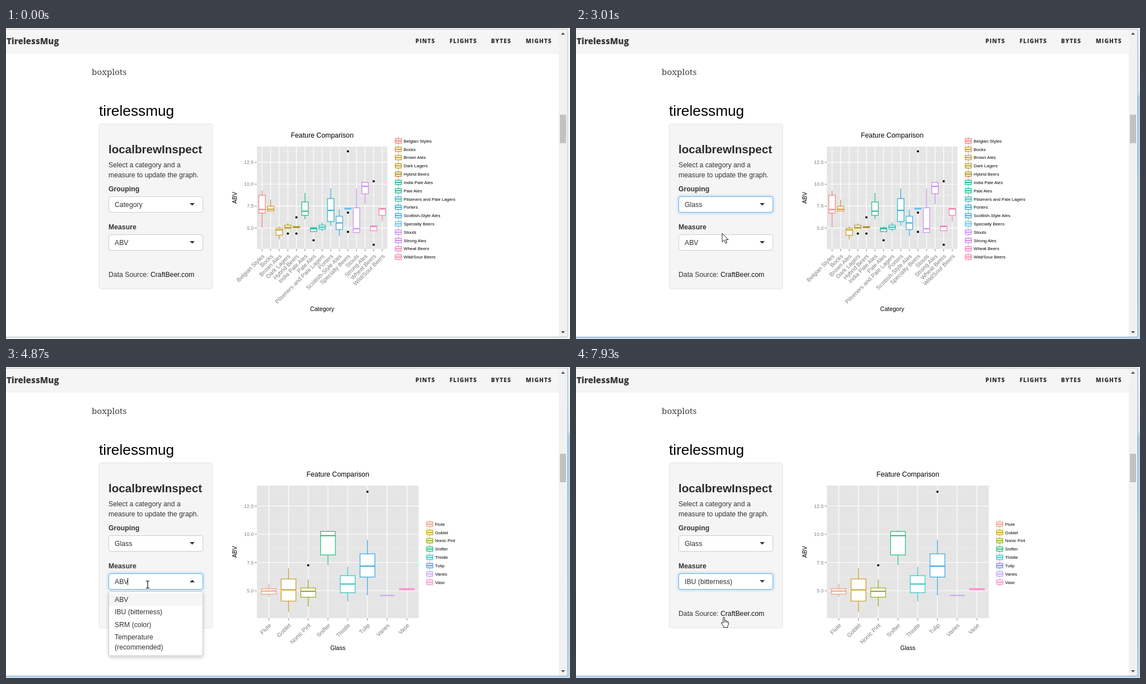
Animation of 1007 by 556 pixels, one loop 8000 ms. Source, as an HTML page:

```html
<!DOCTYPE html>
<html lang="en">
<head>
<meta charset="utf-8">
<title>boxplots</title>
<style>
html, body { margin: 0; width: 100%; height: 100%; overflow: hidden; background: #fff; }
svg { display: block; width: 1007px; height: 556px; font: 12.25px "Liberation Sans", Arial, sans-serif; }
text { white-space: pre; }
.nav { font: 800 10.2px "Open Sans", sans-serif; letter-spacing: 1px; }
.brand { font: 800 15px "Open Sans", sans-serif; }
.serif { font: 500 15.3px "Noto Serif", serif; }
</style>
</head>
<body>
<svg id="stage" viewBox="0 0 1007 556">
  <defs>
    <linearGradient id="edge" x2="0" y2="1">
      <stop offset="0" stop-color="#f2f6fa"/><stop offset=".2" stop-color="#dfeaf5"/>
      <stop offset=".22" stop-color="#b5d2ec"/><stop offset="1" stop-color="#c3daf0"/>
    </linearGradient>
    <filter id="glow" x="-10%" y="-40%" width="120%" height="180%"><feGaussianBlur stdDeviation="2"/></filter>
    <filter id="shade" x="-10%" y="-20%" width="120%" height="150%">
      <feDropShadow dx="0" dy="3" stdDeviation="3" flood-opacity=".2"/>
    </filter>
  </defs>
  <g id="page"></g>
  <g id="live"></g>
</svg>
<script>
const LOOP = 8000;
const $ = id => document.getElementById(id);
const rect = (x, y, w, h, fill, more = '') =>
  `<rect x="${x}" y="${y}" width="${w}" height="${h}" fill="${fill}" ${more}/>`;
const line = (x1, y1, x2, y2, color, w = 1) =>
  `<path d="M${x1} ${y1}L${x2} ${y2}" stroke="${color}" stroke-width="${w}"/>`;
const text = (x, y, s, fill = '#333', more = '') => `<text x="${x}" y="${y}" fill="${fill}" ${more}>${s}</text>`;
const size = n => `font-size="${n}"`;
const MID = 'text-anchor="middle" ', END = 'text-anchor="end" ';

// Each box: name, colour, y of high whisker, upper quartile, median, lower quartile, low whisker, outliers
const byCategory = {
  title: 'Category', right: 681, bottom: 395, y5: 357.6, unit: 15.67, keyX: 694, keyY: 202,
  boxes: [
    ['Belgian Styles', '#f77b7b', 291, 299, 324.5, 331, 357],
    ['Bocks', '#d6932c', 307, 318.5, 324, 327, 327],
    ['Brown Ales', '#c79a20', 355, 358, 361, 370.5, 378],
    ['Dark Lagers', '#b99a17', 349, 352.5, 356.5, 358, 358, 367.5],
    ['Hybrid Beers', '#a98f18', 355, 355, 356, 357, 357, 338.5, 367.5],
    ['India Pale Ales', '#1bb68c', 295, 311, 327.5, 335, 342],
    ['Pale Ales', '#19b79b', 355, 357, 359, 364, 364, 379.5],
    ['Pilseners and Pale Lagers', '#27b9b4', 348, 352.5, 356, 359.5, 363],
    ['Porters', '#1fb0d2', 287, 305, 326, 346, 353],
    ['Scottish-Style Ales', '#37abdc', 324.5, 336.5, 348.5, 360.5, 372],
    ['Specialty Beers', '#5cc0ee', 322, 322, 322.7, 324, 324, 220.5, 330, 364.5],
    ['Stouts', '#cb8cf0', 287, 321.5, 359, 365.5, 366],
    ['Strong Ales', '#c983ee', 276, 276, 283, 296.5, 315],
    ['Wheat Beers', '#f580c0', 353, 354, 355, 362.5, 363, 274, 387.5],
    ['Wild/Sour Beers', '#f97fab', 322, 322.5, 323.5, 335, 346]
  ]
};
const byGlass = {
  title: 'Glass', right: 737, bottom: 449, y5: 400, unit: 20.2, keyX: 750, keyY: 281,
  boxes: [
    ['Flute', '#ec9b7c', 388, 396.5, 400.5, 406, 411],
    ['Goblet', '#d09a22', 360, 379, 398.5, 418.5, 438],
    ['Nonic Pint', '#98aa14', 380, 395, 401, 411.5, 428, 354.5],
    ['Snifter', '#1fbd76', 292, 294, 301.5, 336, 354],
    ['Thistle', '#2cc3c8', 357, 373, 388, 403.5, 419],
    ['Tulip', '#35a4e8', 309, 334, 356, 375.5, 408, 223],
    ['Varies', '#c8a2f5', 408.5, 408.5, 408.5, 408.5, 408.5],
    ['Vase', '#fb8fd0', 396, 396, 397.3, 398.5, 398.5]
  ]
};

function boxplot(x, w, color, [high, q3, mid, q1, low]) {
  return line(x, high, x, q3, color, 1.2) + line(x, q1, x, low, color, 1.2) +
    rect(x - w / 2, q3, w, q1 - q3, '#fff', `stroke="${color}" stroke-width="1.2"`) +
    line(x - w / 2, mid, x + w / 2, mid, color, 2);
}

function chart({ title, right, bottom, y5, unit, keyX, keyY, boxes }) {
  const left = 448, top = 212, center = (left + right) / 2;
  const step = (right - left) / (boxes.length + .2);
  const yOf = v => y5 - (v - 5) * unit;
  let s = rect(left, top, right - left, bottom - top, '#e5e5e5');
  for (let v = 3.75; v < 14; v += 2.5) s += line(left, yOf(v), right, yOf(v), '#efefef', .7);
  for (let v = 5; v < 13; v += 2.5) {
    s += line(left, yOf(v), right, yOf(v), '#fff', 1.2) + line(left - 4, yOf(v), left, yOf(v), '#7f7f7f') +
      text(left - 6, yOf(v) + 3, v.toFixed(1), '#7f7f7f', END + size(8.7));
  }
  const xOf = i => left + step * (i + .6);
  boxes.forEach((b, i) => s += line(xOf(i), top, xOf(i), bottom, '#fff', 1.2));
  boxes.forEach(([name, color, ...ys], i) => {
    const x = xOf(i), ky = keyY + i * 14.82, kx = keyX + 6.5;
    s += line(x, bottom, x, bottom + 4, '#7f7f7f') + boxplot(x, step * .75, color, ys);
    ys.slice(5).forEach(y => s += `<circle cx="${x}" cy="${y}" r="2"/>`);
    s += text(0, 0, name, '#7f7f7f', END + size(10.3) + ` transform="translate(${x + 5} ${bottom + 13.5}) rotate(-45)"`);
    s += rect(keyX, ky - 7, 13, 14, '#f2f2f2') +
      boxplot(kx, 11, color, [ky - 6, ky - 3.7, ky, ky + 3.7, ky + 6]) +
      text(keyX + 16, ky + 2.8, name, '#000', size(7.9));
  });
  return s + text(center, 196, 'Feature Comparison', '#000', MID + size(12.3)) +
    text(center, 505.5, title, '#000', MID + size(10.6)) +
    text(0, 0, 'ABV', '#000', MID + size(10.6) + ` transform="translate(412 ${(top + bottom) / 2}) rotate(-90)"`);
}

function page() {
  let s = rect(0, 0, 987, 45, '#f5f5f5') + line(0, 45, 987, 45, '#ececec') +
    text(1, 29, 'TirelessMug', '#3a3a3a', 'class="brand"') +
    text(153, 84, 'boxplots', '#404040', 'class="serif"');
  [['PINTS', 731], ['FLIGHTS', 792], ['BYTES', 866], ['MIGHTS', 928]]
    .forEach(([label, x]) => s += text(x, 27, label, '#333', 'class="nav"'));
  s += rect(987, 3, 15, 549, '#f1f1f1') + rect(989, 155, 11, 51, '#c1c1c1') +
    '<path d="M991 12l3.5-4 3.5 4zM991 542l3.5 4 3.5-4z" fill="#505050"/>';
  s += text(166, 157, 'tirelessmug', '#000', size(26.25)) +
    rect(166.5, 171.5, 202.5, 295, '#f5f5f5', 'rx="3.5" stroke="#e3e3e3"') +
    text(183, 223.5, 'localbrewInspect', '#2b2b2b', 'font-weight="700" ' + size(20.6)) +
    text(183, 249.3, 'Select a category and a') +
    text(183, 266.5, 'measure to update the graph.') +
    text(183, 292, 'Grouping', '#333', 'font-weight="700"') +
    text(183, 360, 'Measure', '#333', 'font-weight="700"') +
    text(183, 445, 'Data Source: <tspan fill="#111">CraftBeer.com</tspan>');
  return s + `<g id="first">${chart(byCategory)}</g><g id="second">${chart(byGlass)}</g>`;
}

function frame(active) {
  return rect(0, 0, 1007, 2, '#fbfbfb') + line(0, 2, 1003, 2, '#b4b4b4') +
    rect(1002, 3, 5, 553, active ? 'url(#edge)' : '#f6f8fa') +
    rect(0, 553, 1007, 3, active ? '#c6dcf0' : '#eef2f5') +
    line(1003, 2, 1003, 553, active ? '#8aa9c4' : '#b8b8b8') +
    line(0, 552.5, 1003, 552.5, active ? '#7fa3c2' : '#b8b8b8');
}

function select(y, value, focus, open, caretOn) {
  const box = more => rect(183.5, y + .5, 168, 28, '#fff', `rx="3.5" ${more}`);
  let s = focus ? box('stroke="#66afe9" stroke-width="3" opacity=".6" filter="url(#glow)"') : '';
  s += box(`stroke="${focus ? '#66afe9' : '#ccc'}"`) + text(194, y + 18.7, value) +
    `<path d="${open ? `M328 ${y + 16}h9l-4.5 -4.5z` : `M328 ${y + 12}h9l-4.5 4.5z`}" fill="#333"/>`;
  return caretOn ? s + line(217.5, y + 8, 217.5, y + 21, '#222') : s;
}

const ROW = 22.5;
const groupings = ['Category', 'Glass', 'Yeast'];
const measures = ['ABV', 'IBU (bitterness)', 'SRM (color)', 'Temperature|(recommended)'];

function dropdown(y, options, cursorY) {
  const top = y + 35.5, tall = options.some(o => o.includes('|')) ? 17.5 : 0;
  const hover = cursorY < top ? 0 : Math.min(options.length - 1, Math.floor((cursorY - top) / ROW));
  let s = rect(183.5, y + 32.5, 168, options.length * ROW + tall + 7, '#fff', 'rx="3" stroke="#ccc" filter="url(#shade)"');
  options.forEach((option, i) => {
    const lines = option.split('|'), oy = top + i * ROW;
    if (i === hover) s += rect(184, oy, 167, ROW + (lines.length - 1) * 17.5, '#f5f5f5');
    lines.forEach((part, k) => s += text(194, oy + 15.4 + k * 17.3, part));
  });
  return s;
}

// Pointer moves: first jump at, last jump at, number of jumps, final x, final y
const moves = [
  [200, 1240, 9, 299, 318], [1390, 1440, 2, 299, 310], [1850, 2680, 8, 262, 367],
  [3010, 3010, 1, 261, 367], [3320, 3460, 2, 257, 424], [3600, 3750, 2, 252, 388],
  [4640, 4640, 1, 253, 389], [5200, 5350, 2, 250, 415], [5650, 6430, 5, 240, 457],
  [6590, 6590, 1, 241, 461], [6740, 7260, 4, 246, 437], [7680, 7930, 3, 264, 447]
];
function pointer(t) {
  let x = 276, y = 540;
  for (const [from, to, n, ex, ey] of moves) {
    if (t < from) break;
    const jumps = n === 1 ? 1 : Math.min(n, 1 + Math.floor((t - from) / (to - from) * (n - 1) + 1e-6));
    x += (ex - x) * jumps / n;
    y += (ey - y) * jumps / n;
  }
  return [Math.round(x), Math.round(y)];
}

const shapes = {
  arrow: '<path d="M0 0V15.5L3.6 12.2 6 18 8.5 17 6.1 11.4H11Z" fill="#fff" stroke="#222"/>',
  beam: '<path d="M-3 -6.5Q0 -6.5 0 -5Q0 -6.5 3 -6.5M0 -5V5M-3 6.5Q0 6.5 0 5Q0 6.5 3 6.5" fill="none" stroke="#111" stroke-width="1.2"/>',
  hand: '<path d="M-1.3 11V1.7Q-1.3 .5 0 .5T1.3 1.7V6.5Q3.6 5.4 4 7.2Q6 6.4 6.3 8.2Q8.2 7.6 8.2 9.5V13Q8 15 6.7 16.2V18.5H-.6V16.5L-4.6 11.4Q-5 9.4 -3 9.8Z" fill="#fff" stroke="#222"/>' +
    '<path d="M1.3 6.5V10M4 7.2V10M6.3 8.2V10.5" stroke="#222" stroke-width=".9"/>'
};
function cursorKind(x, y, openY) {
  const inside = (l, t, r, b) => x >= l && x <= r && y >= t && y <= b;
  if (openY) return y > openY + 31 ? 'hand' : 'beam';
  return inside(183, 301, 352, 330) || inside(183, 369, 352, 398) || inside(257, 433, 336, 450) ? 'hand' : 'arrow';
}

function scene(t) {
  const openA = t >= 1710 && t < 2920, openB = t >= 4640 && t < 7550;
  const [x, y] = pointer(t);
  const blink = openB && Math.floor((t - 4670) / 530) % 2 === 0;
  let s = frame(t >= 1710) +
    select(301, t < 2920 ? 'Category' : 'Glass', t >= 1710 && t < 4640, openA) +
    select(369, t < 7550 ? 'ABV' : 'IBU (bitterness)', t >= 4640, openB, blink);
  if (openA) s += dropdown(301, groupings, y);
  if (openB) s += dropdown(369, measures, y);
  if (t >= 200) s += `<g transform="translate(${x} ${y})">${shapes[cursorKind(x, y, openA ? 301 : openB ? 369 : 0)]}</g>`;
  return s;
}

$('page').innerHTML = page();
let shown = '';
const start = performance.now();
function draw() {
  const t = (performance.now() - start) % LOOP, next = scene(t);
  if (next !== shown) $('live').innerHTML = shown = next;
  $('first').style.display = t < 4040 ? '' : 'none';
  $('second').style.display = t < 4040 ? 'none' : '';
  requestAnimationFrame(draw);
}
draw();
</script>
</body>
</html>
```
